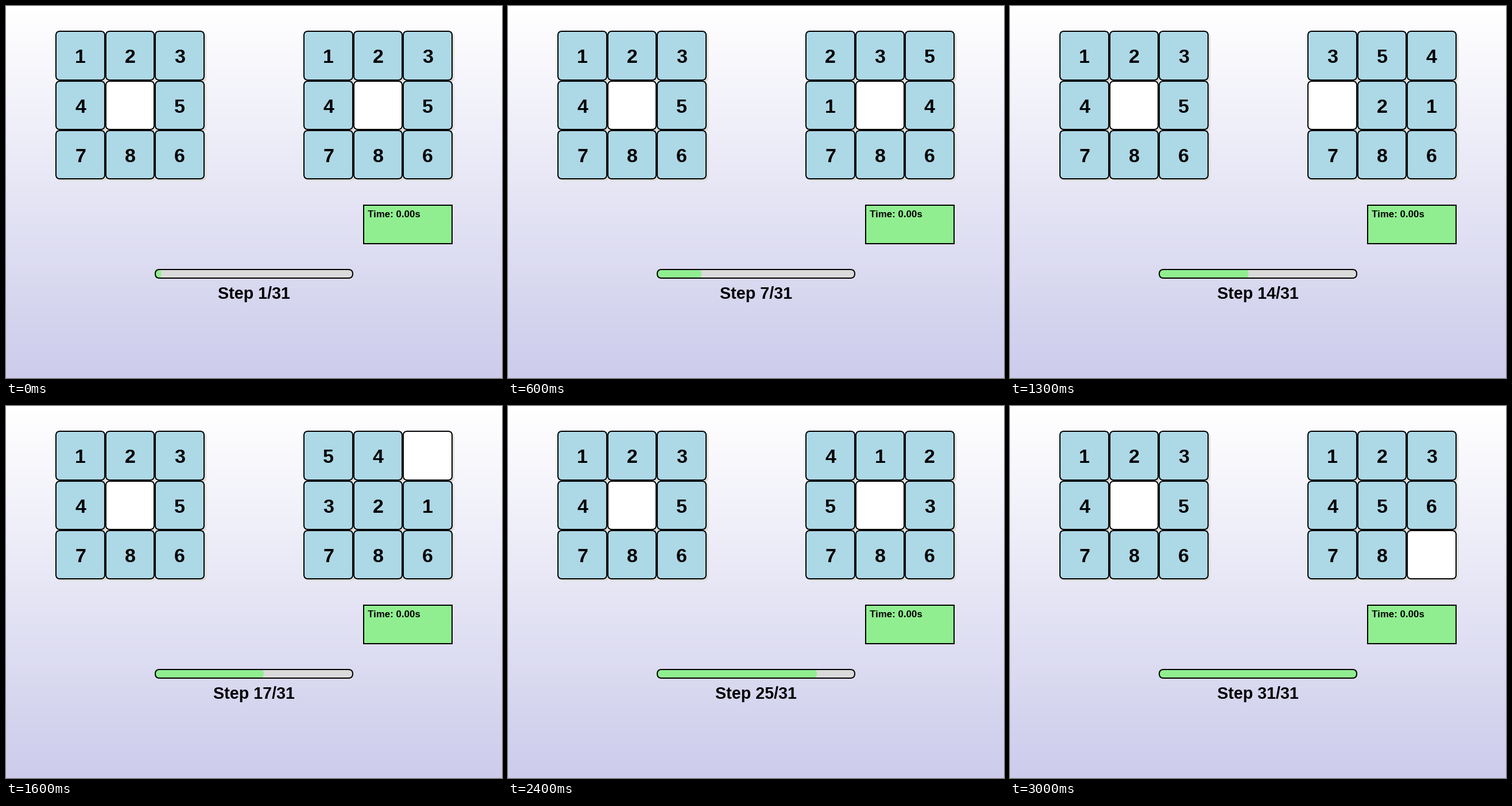
Animation, 864 px wide and 648 px high, one loop 3.1 s. Source, as a matplotlib script:

```python
import numpy as np
import matplotlib.pyplot as plt
from matplotlib.animation import FuncAnimation
from matplotlib.patches import FancyBboxPatch, Rectangle

W, H = 864, 648
CELL = 86.4
BLUE, GREEN, GRAY = "#add8e6", "#90ee90", "#dadada"
SHADOW = "#dededa"
START = [1, 2, 3, 4, 0, 5, 7, 8, 6]
MOVES = "LURRDL" * 4 + "LURRDD"
STEP = {"L": -1, "R": 1, "U": -3, "D": 3}


def solve_path():
    """All boards from the start to the solved one."""
    boards = [START]
    for move in MOVES:
        board = boards[-1][:]
        gap = board.index(0)
        other = gap + STEP[move]
        board[gap], board[other] = board[other], 0
        boards.append(board)
    return boards


BOARDS = solve_path()
TOTAL = len(BOARDS)

# At 72 dpi one point equals one pixel.
fig = plt.figure(figsize=(W / 72, H / 72), dpi=72)
ax = fig.add_axes([0, 0, 1, 1])
ax.axis("off")


def rounded(x0, y0, x1, y1, radius, z, **style):
    style.setdefault("lw", 0)
    box = FancyBboxPatch((x0, y0), x1 - x0, y1 - y0, zorder=z, snap=False,
                         boxstyle=f"round,pad=0,rounding_size={radius}", **style)
    return ax.add_patch(box)


def label(x, y, text, size, align="center"):
    return ax.text(x, y, text, size=size, ha=align, va="baseline", zorder=9,
                   family="Liberation Sans", weight="bold", color="black")


def make_grid(left, top):
    tiles, digits = [], []
    for i in range(9):
        x, y = left + i % 3 * CELL, top + i // 3 * CELL
        x0, y0, x1, y1 = (round(v) for v in (x, y, x + CELL, y + CELL))
        rounded(x0 + 3, y0 + 3, x1 + 3, y1 + 3, 8, 2, fc=SHADOW, ec="none")
        tiles.append(rounded(x0 + 1, y0 + 1, x1 - 1, y1 - 1, 7, 3,
                             fc=BLUE, ec="black", lw=2))
        digits.append(label(x + CELL / 2, y + CELL / 2 + 13, "", 34))
    return tiles, digits


def show_board(grid, board):
    for tile, digit, n in zip(*grid, board):
        tile.set_facecolor(BLUE if n else "white")
        digit.set_text(str(n) if n else "")


# Background gradient
fade = np.linspace(0, 1, H)[:, None, None]
sky = (1 - fade) * np.array([255, 255, 255]) + fade * np.array([204, 203, 235])
ax.imshow(np.round(sky).astype(np.uint8), extent=(0, W, H, 0), aspect="auto",
          interpolation="nearest", zorder=0)
ax.set_xlim(0, W)
ax.set_ylim(H, 0)

show_board(make_grid(CELL, CELL / 2), START)
play = make_grid(6 * CELL, CELL / 2)

# Time panel
ax.add_patch(Rectangle((623, 347), 154, 67, fc=GREEN, ec="black", lw=2,
                       joinstyle="miter", snap=False, zorder=3))
label(630.5, 368, "Time: 0.00s", 16.9, "left")

# Progress bar
BAR_X, BAR_W = 259, 346
rounded(BAR_X, 458, BAR_X + BAR_W, 475, 8.5, 3, fc=GRAY, ec="none")
fill = rounded(BAR_X, 458, BAR_X + BAR_W, 475, 8, 4, fc=GREEN, ec="none")
rounded(BAR_X + 1, 459, BAR_X + BAR_W - 1, 474, 7.5, 5, fc="none",
        ec="black", lw=2)
caption = label(W / 2, 509.5, "", 28.7)


def update(frame):
    show_board(play, BOARDS[frame])
    width = BAR_W * (frame + 1) / TOTAL
    fill.set_width(width)
    fill.set_boxstyle("round", pad=0, rounding_size=min(8, width / 2))
    caption.set_text(f"Step {frame + 1}/{TOTAL}")
    return []


anim = FuncAnimation(fig, update, frames=TOTAL, interval=100, repeat=True,
                     repeat_delay=0, init_func=lambda: update(0))
plt.show()
```
